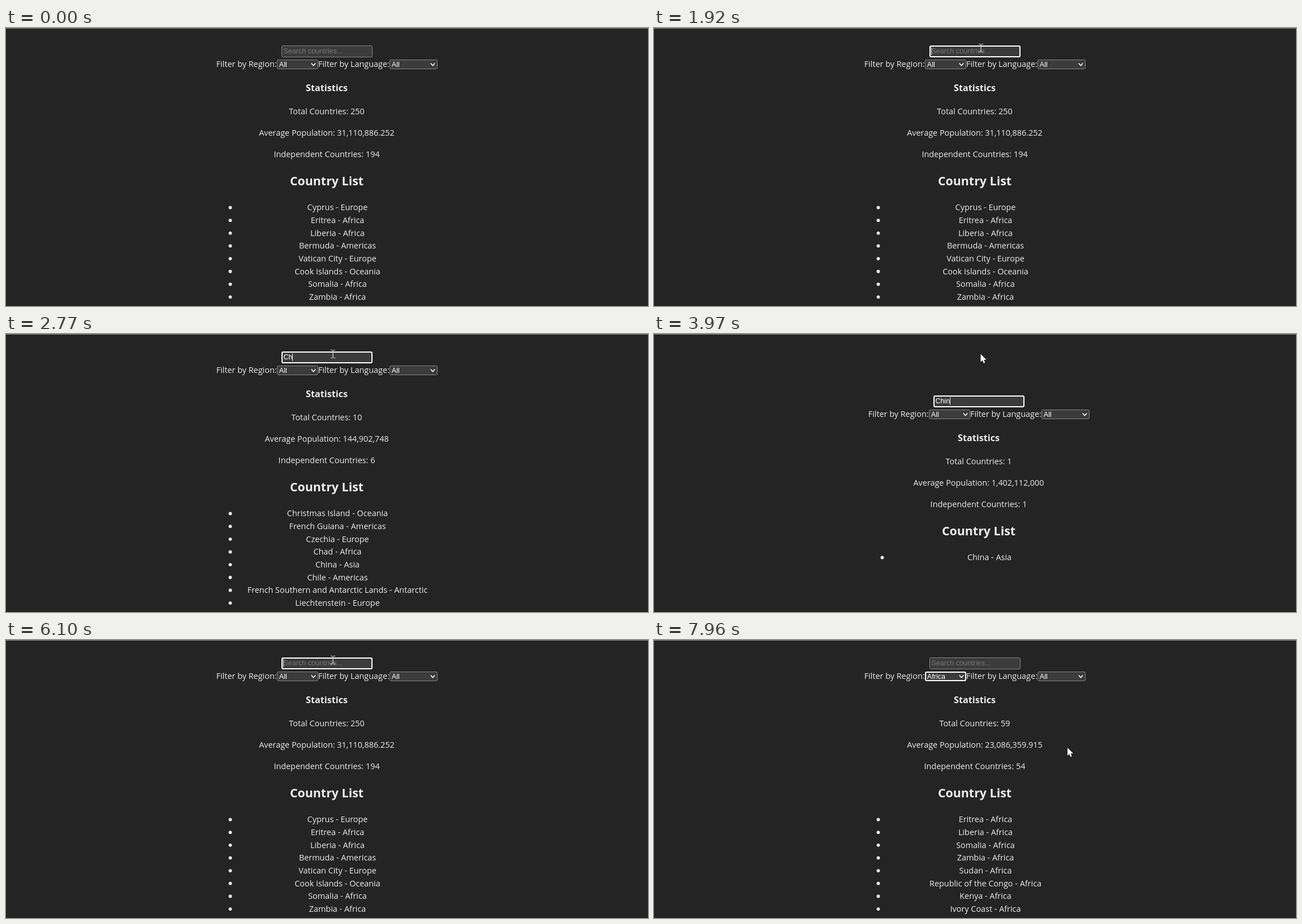
Write an HTML page with a canvas that moves like this. It is 1135x493 px and loops after 8 s.

```html
<!DOCTYPE html>
<html lang="en">
<head>
<meta charset="utf-8">
<title>Country search</title>
<style>
  html, body { margin: 0; height: 100%; overflow: hidden; background: #242424; }
  canvas { display: block; }
</style>
</head>
<body>
<canvas id="stage" width="1135" height="493"></canvas>
<script>
const ctx = document.getElementById('stage').getContext('2d');
const LOOP = 8000;
const TEXT = '#ececec', FIELD = '#3b3b3b', BORDER = '#858585', PANEL = '#4a4a4a';
const UI = '"Open Sans", "Noto Sans", sans-serif';
const BODY = `14.4px ${UI}`;
const CONTROL = '12.6px "Liberation Sans", Arial, sans-serif';
const ROW = 22.65;
const REGIONS = ['All', 'Africa', 'Americas', 'Asia', 'Europe', 'Oceania', 'Antarctic'];

const view = (total, average, independent, list) =>
  ({ total, average, independent, list: list.split(', ') });

const views = {
  '': view(250, '31,110,886.252', 194, 'Cyprus - Europe, Eritrea - Africa, Liberia - Africa, Bermuda - Americas, Vatican City - Europe, Cook Islands - Oceania, Somalia - Africa, Zambia - Africa'),
  C: view(58, '36,660,289.069', 39, 'Cyprus - Europe, Vatican City - Europe, Cook Islands - Oceania, Croatia - Europe, Republic of the Congo - Africa, American Samoa - Oceania, Ivory Coast - Africa, São Tomé and Príncipe - Africa'),
  Ch: view(10, '144,902,748', 6, 'Christmas Island - Oceania, French Guiana - Americas, Czechia - Europe, Chad - Africa, China - Asia, Chile - Americas, French Southern and Antarctic Lands - Antarctic, Liechtenstein - Europe'),
  Chi: view(3, '477,309,035', 3, 'Czechia - Europe, China - Asia, Chile - Americas'),
  Chin: view(1, '1,402,112,000', 1, 'China - Asia'),
  Africa: view(59, '23,086,359.915', 54, 'Eritrea - Africa, Liberia - Africa, Somalia - Africa, Zambia - Africa, Sudan - Africa, Republic of the Congo - Africa, Kenya - Africa, Ivory Coast - Africa'),
};

// [time, value] tracks that hold until the next entry
const typed = [[0, ''], [2430, 'C'], [2640, 'Ch'], [2790, 'Chi'], [2900, 'Chin'],
               [4240, 'Chi'], [4440, 'Ch'], [4700, 'C'], [4840, '']];
const caret = [[0, 0], [1840, 1], [3450, 0], [3970, 1], [4840, 0], [5030, 1], [5560, 0], [6100, 1], [6560, 0]];
const infoAlpha = [[0, 0], [1970, 1], [2430, 0.85], [2500, 0.55], [2570, 0.24], [2640, 0.08], [2720, 0]];
const menuAlpha = [[0, 0], [6630, 1], [7290, 0.8], [7355, 0.5], [7420, 0.25], [7485, 0]];

// Pointer moves: start, end, steps, then from, control and to points
const moves = [
  [90, 500, 7, 585, 528, 1010, 30, 1045, 172],
  [700, 830, 3, 1045, 172, 970, 240, 1093, 201],
  [1040, 1840, 13, 1093, 201, 1260, -25, 577.5, 35.5],
  [6230, 6560, 6, 577.5, 35.5, 640, 100, 530, 66],
  [6890, 7090, 4, 530, 66, 528, 125, 507, 96],
  [7690, 7960, 5, 507, 96, 620, 140, 731, 191],
];

const at = (track, t) => track.findLast(([start]) => start <= t)[1];

function pointer(t) {
  const move = moves.findLast(([start]) => start <= t);
  if (!move) return null;
  const [start, end, steps, x0, y0, x1, y1, x2, y2] = move;
  const step = Math.floor((t - start) / (end - start) * (steps - 1) + 1e-6) + 1;
  const u = Math.min(1, step / steps), v = 1 - u;
  const curve = (a, b, c) => v * v * a + 2 * u * v * b + u * u * c;
  return [curve(x0, x1, x2), curve(y0, y1, y2)];
}

function text(str, x, y, font = BODY, color = TEXT, align = 'left') {
  ctx.font = font;
  ctx.fillStyle = color;
  ctx.textAlign = align;
  ctx.fillText(str, x, y);
}

const centered = (str, y, font, x = 567) => text(str, x, y, font, TEXT, 'center');

function box(x, y, w, h, radius, fill, stroke, width = 1) {
  ctx.beginPath();
  ctx.roundRect(x, y, w, h, radius);
  if (fill) { ctx.fillStyle = fill; ctx.fill(); }
  if (stroke) { ctx.strokeStyle = stroke; ctx.lineWidth = width; ctx.stroke(); }
}

function line(color, width, ...points) {
  ctx.beginPath();
  for (let i = 0; i < points.length; i += 2) ctx.lineTo(points[i], points[i + 1]);
  ctx.strokeStyle = color;
  ctx.lineWidth = width;
  ctx.stroke();
}

function dot(x, y, r, color) {
  ctx.beginPath();
  ctx.arc(x, y, r, 0, 7);
  ctx.fillStyle = color;
  ctx.fill();
}

// The border lies wholly inside the given rectangle
function field(x, y, w, h, focused) {
  const width = focused ? 2 : 1;
  box(x + width / 2, y + width / 2, w - width, h - width, 2, FIELD, focused ? '#fff' : BORDER, width);
}

function select(x, w, value, focused) {
  field(x, 56, w, 17, focused);
  text(value, x + 3.8, 69, CONTROL, '#fff');
  const cx = x + w - 8.5;
  line('#fff', 1.5, cx - 3.8, 62.6, cx, 66.6, cx + 3.8, 62.6);
}

function page(t, query, region) {
  const data = views[region === 'All' ? query : region];
  const searching = t >= 1840 && t < 6560;

  field(487, 31, 161, 21, searching);
  text(query || 'Search countries...', 490.4, 45, CONTROL, query ? '#fff' : '#757575');
  if (at(caret, t)) {
    const x = 490.5 + (query ? Math.round(ctx.measureText(query).width) : 0);
    line('#ddd', 1, x, 34, x, 48);
  }
  text('Filter by Region:', 371.7, 69);
  select(479, 73, region, t >= 6630);
  text('Filter by Language:', 552, 69);
  select(678, 85, 'All', false);

  centered('Statistics', 112, `bold 16.2px ${UI}`);
  centered(`Total Countries: ${data.total}`, 153);
  centered(`Average Population: ${data.average}`, 191);
  centered(`Independent Countries: ${data.independent}`, 229);
  centered('Country List', 279, `bold 21.4px ${UI}`);
  data.list.forEach((name, i) => {
    dot(396.5, 318.5 + i * ROW, 2.9, TEXT);
    centered(name, Math.round(323.4 + i * ROW), BODY, 586);
  });
}

function shadowed(draw) {
  ctx.shadowColor = '#0006';
  ctx.shadowBlur = 9;
  ctx.shadowOffsetY = 3;
  draw();
  ctx.shadowColor = 'transparent';
}

function infoPopup(alpha) {
  ctx.globalAlpha = alpha;
  shadowed(() => box(491, 55, 293, 179, 7, PANEL));
  text('Saved personal info', 503.5, 75, `10.3px ${UI}`, '#bbb');
  line('#ddd', 1, 766, 68, 773, 75);
  line('#ddd', 1, 773, 68, 766, 75);
  ['GA, United States', 'France', 'Georgia, United States'].forEach((place, i) =>
    text(place, 503.5, 108 + i * 34.6, `bold 10.8px ${UI}`, '#fff'));
  line('#666', 1, 491, 194.5, 784, 194.5);
  ctx.beginPath();
  ctx.arc(509, 211, 2.8, 0, 7);
  ctx.moveTo(513, 217);
  ctx.lineTo(504, 217);
  ctx.quadraticCurveTo(504, 222, 510, 222);
  ctx.strokeStyle = '#ddd';
  ctx.stroke();
  dot(513.5, 219, 2.5, '#ddd');
  text('Manage personal info in Dravel', 527.5, 219.5, `10.8px ${UI}`, '#ddd');
  ctx.globalAlpha = 1;
}

function regionMenu(alpha, hoverY) {
  ctx.globalAlpha = alpha;
  shadowed(() => box(479.5, 74.5, 72, 121, 0, FIELD, BORDER));
  const hovered = Math.max(0, Math.floor((hoverY - 75) / 17));
  REGIONS.forEach((name, i) => {
    const active = i === hovered;
    if (active) box(480, 75 + i * 17, 71, 17, 0, '#99c8ff');
    text(name, 482.8, 88 + i * 17, CONTROL, active ? FIELD : '#fff');
  });
  ctx.globalAlpha = 1;
}

function drawPointer([x, y], overInput) {
  if (overInput) {
    line('#ddd', 1, x - 3.5, y - 7, x - 1, y - 7, x + 0.5, y - 6, x + 2, y - 7, x + 4.5, y - 7);
    line('#ddd', 1.2, x + 0.5, y - 6, x + 0.5, y + 6);
    line('#ddd', 1, x - 3.5, y + 7, x - 1, y + 7, x + 0.5, y + 6, x + 2, y + 7, x + 4.5, y + 7);
    return;
  }
  const arrow = new Path2D('M0 0V14.2L3.2 11.2 5.4 16.2 7.8 15.2 5.7 10.3H10.2Z');
  ctx.save();
  ctx.translate(x, y);
  ctx.strokeStyle = '#111';
  ctx.lineWidth = 1.4;
  ctx.stroke(arrow);
  ctx.fillStyle = '#fff';
  ctx.fill(arrow);
  ctx.restore();
}

function draw(t) {
  const query = at(typed, t);
  const region = t < 7355 ? 'All' : 'Africa';
  const rows = views[query].list.length;
  // Short lists lose the scrollbar and are centred on the page
  const short = rows < 8;
  const mouse = pointer(t);

  ctx.fillStyle = '#242424';
  ctx.fillRect(0, 0, 1135, 493);
  ctx.fillStyle = '#8a8a8a';
  ctx.fillRect(0, 0, 1135, 1);

  ctx.save();
  if (short) ctx.translate(7, Math.round(78 - (rows - 1) * ROW / 2));
  page(t, query, region);
  ctx.restore();

  const info = at(infoAlpha, t), menu = at(menuAlpha, t);
  if (info) infoPopup(info);
  if (menu) regionMenu(menu, mouse[1]);
  if (mouse) {
    const [x, y] = mouse;
    drawPointer(mouse, !short && x > 487 && x < 648 && y > 31 && y < 52);
  }
}

function tick() {
  draw(performance.now() % LOOP);
  requestAnimationFrame(tick);
}
tick();
</script>
</body>
</html>
```
